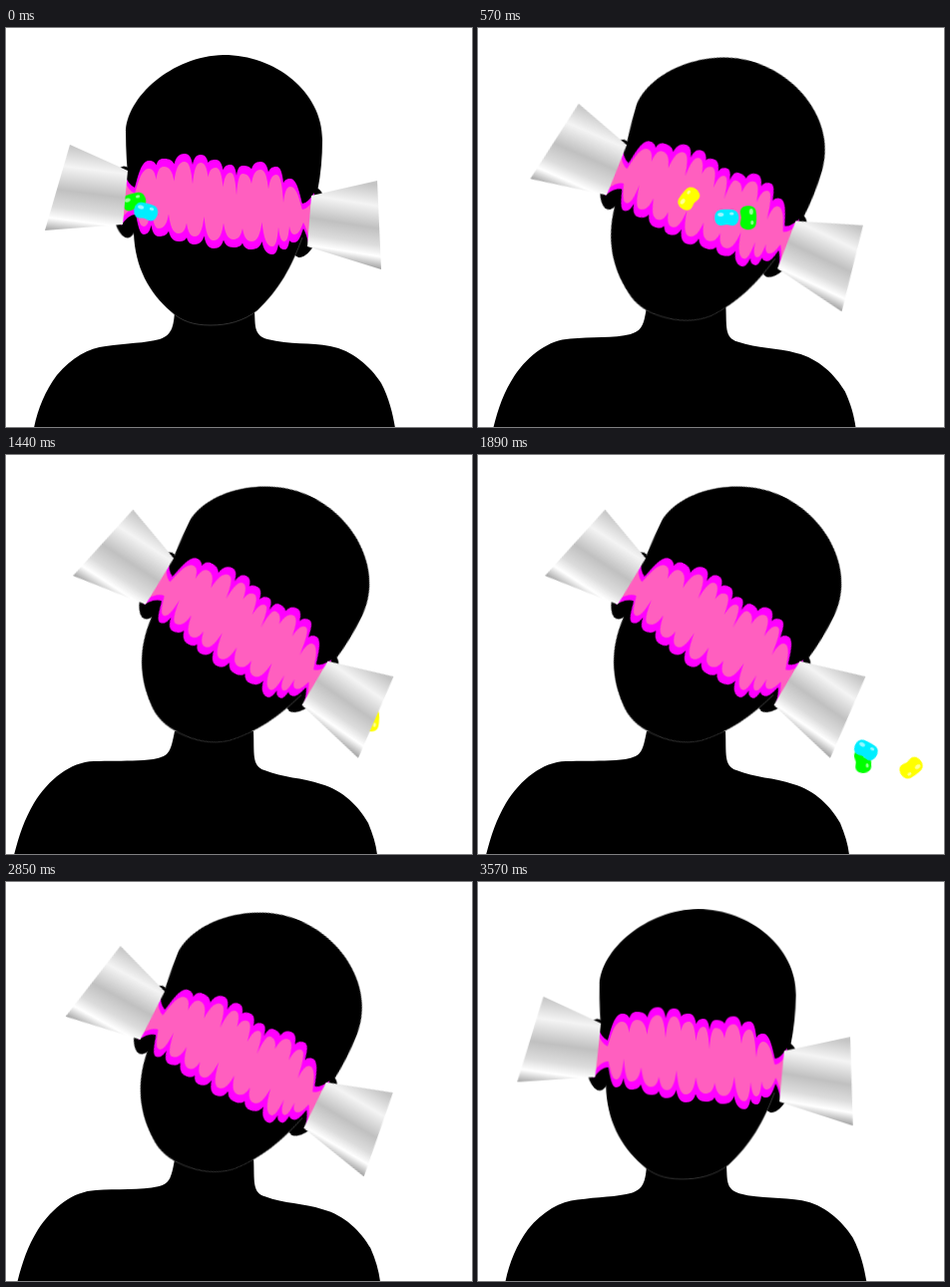
These frames come from a looping animation (467x400 px, 3.6 s). An HTML page:

```html
<!DOCTYPE html>
<html lang="en">
<head>
<meta charset="utf-8">
<title>Candy head</title>
<style>
  html, body { margin: 0; width: 100%; height: 100%; overflow: hidden; background: #fff; }
  svg { display: block; width: 467px; height: 400px; }

  .head, .body, .bean { animation: 3.6s linear infinite; }
  .head { transform-origin: 218px 150px; animation-name: tilt; }
  .body { animation-name: lean; }
  .yellow { fill: #ff0; animation-name: yellow; }
  .cyan { fill: #0ef; animation-name: cyan; }
  .green { fill: #0f0; animation-name: green; }

  @keyframes tilt {
    0%, 100% { transform: translate(0, 0) rotate(0deg); }
    25%, 75% { transform: translate(33.3px, 1.9px) rotate(26deg); }
  }
  @keyframes lean {
    0%, 100% { d: path("M28 401C32 382 39 364 51 348C66 330 83 321 100 319C120 316 140 316 154 312C166 308 168 300 169 284L249 284C250 298 248 308 262 312C285 318 305 315 325 319C347 323 365 339 376 356C384 371 388 388 390 401Z"); }
    25%, 75% { d: path("M8 401C13 382 18 366 28 349C43 325 64 308 88 307C108 306 135 308 152 304C163 301 165 298 169 277L248 277C249 299 246 312 259 316C278 324 296 323 316 330C338 336 354 353 363 369C368 381 371 391 372 401Z"); }
  }
  @keyframes yellow {
    0% { transform: translate(95px, 160px) rotate(-90deg); }
    15.833% { transform: translate(211px, 171px) rotate(-52deg); }
    30% { transform: translate(311px, 221px) rotate(0deg); }
    32.5% { transform: translate(330px, 230px) rotate(10deg); }
    39.167% { transform: translate(361px, 262px) rotate(90deg); }
    54.167% { transform: translate(443px, 320px) rotate(150deg); }
    65%, 100% { transform: translate(502px, 362px) rotate(190deg); }
  }
  @keyframes cyan {
    0% { transform: translate(140px, 184px) rotate(15deg); }
    15.833% { transform: translate(249px, 190px) rotate(0deg); }
    25% { transform: translate(328px, 225px) rotate(30deg); }
    45% { transform: translate(358px, 266px) rotate(10deg); }
    65% { transform: translate(440px, 345px) rotate(60deg); }
    75%, 100% { transform: translate(481px, 384px) rotate(85deg); }
  }
  @keyframes green {
    0% { transform: translate(128px, 174px) rotate(-15deg); }
    15.833% { transform: translate(270.5px, 190px) rotate(90deg); }
    22.222% { transform: translate(332px, 222px) rotate(110deg); }
    45.833% { transform: translate(358px, 267px) rotate(100deg); }
    65% { transform: translate(437px, 381px) rotate(52deg); }
    70.833%, 100% { transform: translate(461px, 416px) rotate(38deg); }
  }
</style>
</head>
<body>
<svg viewBox="0 0 467 400">
  <defs>
    <linearGradient id="metal">
      <stop offset="0" stop-color="#c4c4c4"/>
      <stop offset=".25" stop-color="#f4f4f4"/>
      <stop offset=".52" stop-color="#c0c0c0"/>
      <stop offset=".72" stop-color="#dcdcdc"/>
      <stop offset=".85" stop-color="#fff"/>
      <stop offset="1" stop-color="#a0a0a0"/>
    </linearGradient>
    <linearGradient id="left" href="#metal" gradientUnits="userSpaceOnUse" x1="64" y1="117" x2="53" y2="205"/>
    <linearGradient id="right" href="#metal" gradientUnits="userSpaceOnUse" x1="352" y1="154" x2="339" y2="236"/>
    <g id="bean">
      <path d="M-5-8C-2-8.500 2-8.500 5-8C10-8 12-4 12 0C12 5 9 8 6 8C3 8 2 7 0 7C-2 7-3 8-6 8C-9 8-12 5-12 0C-12-4-10-8-5-8Z"/>
      <g fill="#fff" fill-opacity=".6">
        <ellipse cx="-6" cy="-3" rx="3" ry="1.900"/>
        <ellipse cx="5" cy="-4" rx="2.200" ry="1.500"/>
      </g>
    </g>
  </defs>

  <path class="body"/>

  <g class="head">
    <ellipse cx="120" cy="174.500" rx="14" ry="36" transform="rotate(-3 120 174.500)"/>
    <ellipse cx="302" cy="195" rx="15" ry="36" transform="rotate(15 302 195)"/>
    <path d="M218 27C270 27 317 64 317 112C317 147 311 180 297 210C286 240 274 262 252 283C238 294 222 298 205 298C188 298 176 294 165 284C144 266 129 240 128 205C125 175 120 140 120 105C120 70 166 28 218 27Z"/>
    <path d="M297 210C286 240 274 262 252 283C238 294 222 298 205 298C188 298 176 294 165 284" fill="none" stroke="#666" stroke-width=".5"/>
    <path id="rim" fill="#f0f"/>
    <path id="core" fill="#ff5fbf"/>
  </g>

  <use class="bean yellow" href="#bean"/>
  <use class="bean green" href="#bean"/>
  <use class="bean cyan" href="#bean"/>

  <g class="head">
    <path d="M64 117L122 143L117 197L39 203Z" fill="url(#left)"/>
    <path d="M306 168L372 153L376 242L302 219Z" fill="url(#right)"/>
  </g>
</svg>
<script>
  const upper = [[143, 133], [158, 131], [179, 126], [195, 127], [210, 132],
                 [225, 137], [237, 138], [255, 134], [271, 139], [285, 151]];
  const lower = [[289, 215], [279, 222], [267, 227], [246, 222], [228, 220],
                 [208, 221], [189, 217], [173, 214], [153, 209], [138, 207]];

  // Row of rounded lobes with pointed folds; side is 1 for the upper row, -1 for the lower.
  function lobes(peaks, side, inset, depth, from, to) {
    let start = from;
    return peaks.map(([x, py], i) => {
      const y = py + side * inset;
      const next = peaks[i + 1];
      const fold = depth * (1 + 0.3 * (i % 3 - 1));
      const end = next
        ? [(x + next[0]) / 2, (py + next[1]) / 2 + side * (inset + fold)]
        : to;
      const bend = p => {
        const k = p === from || p === to ? 0.2 : 0.6;
        return `${p[0] + (x - p[0]) * 0.15} ${p[1] + (y - p[1]) * k}`;
      };
      const d = `C${bend(start)} ${x + (start[0] - x) * 0.6} ${y} ${x} ${y}` +
                `C${x + (end[0] - x) * 0.6} ${y} ${bend(end)} ${end}`;
      start = end;
      return d;
    }).join('');
  }

  const band = (inset, depth, gap) =>
    `M116 ${142 + gap}Q123 ${158 + gap} 129 ${160 + gap}` +
    lobes(upper, 1, inset, depth, [129, 160 + gap], [297, 176 + gap]) +
    `Q302 ${176 + gap} 309 ${165 + gap}L304 ${219 - gap}Q301 ${206 - gap} 298 ${201 - gap}` +
    lobes(lower, -1, inset, depth, [298, 201 - gap], [130, 187 - gap]) +
    `Q124 ${186 - gap} 115 ${198 - gap}Z`;

  document.getElementById('rim').setAttribute('d', band(0, 8, 0));
  document.getElementById('core').setAttribute('d', band(8, 17, 6));
</script>
</body>
</html>
```
